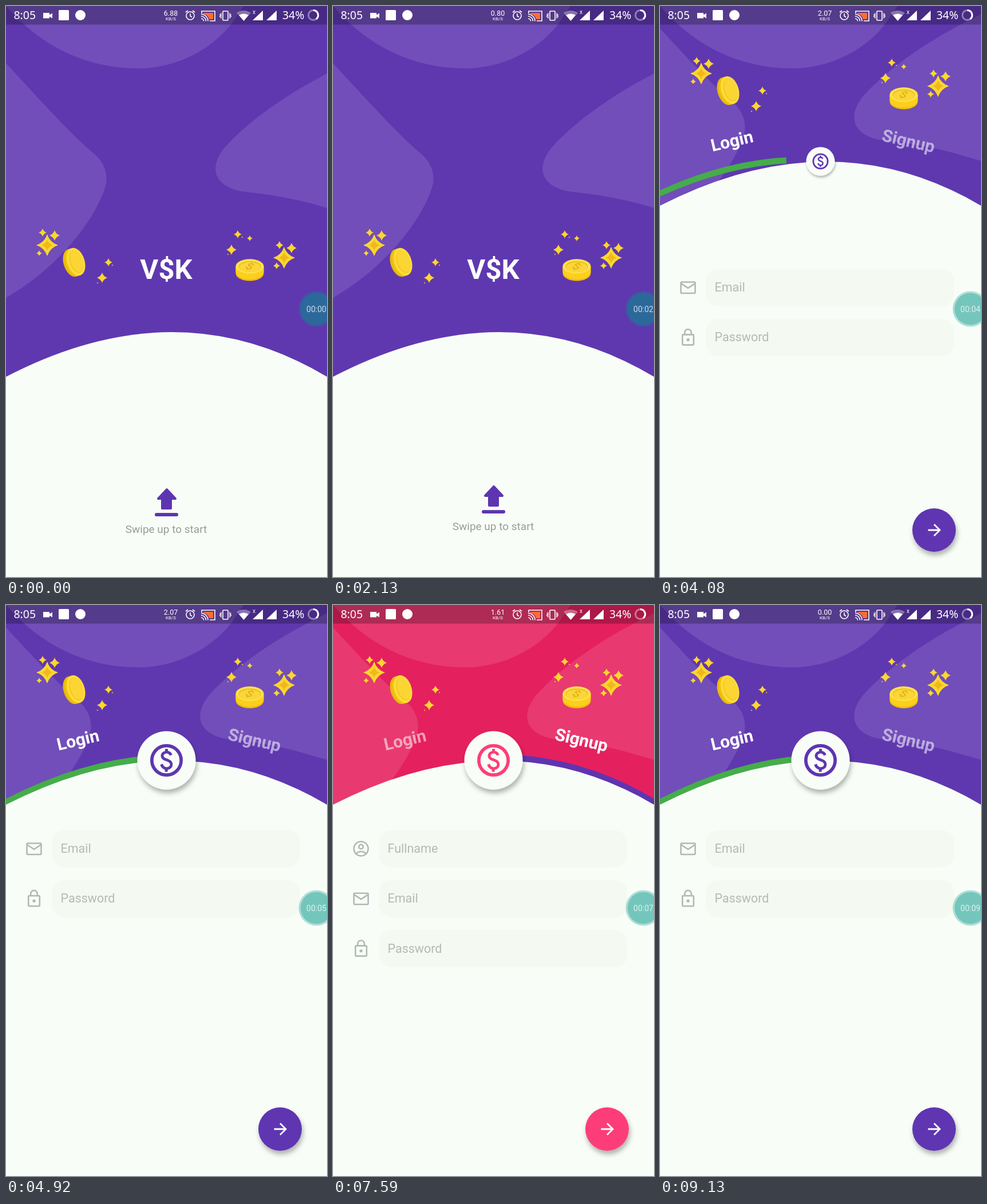
Animation of 561 by 998 pixels, one loop 9.16 s. Source, as an HTML page:

```html
<!DOCTYPE html>
<html lang="en">
<head>
<meta charset="utf-8">
<title>Onboarding</title>
<style>
  html, body { margin: 0; width: 100%; height: 100%; overflow: hidden; background: #f8fdf7; }
  svg { display: block; width: 561px; height: 998px; }
  text { font-family: Roboto, sans-serif; }
  .bar text { fill: #fff; }
  .bar .sys { font: 19.4px "Noto Sans", "Open Sans", sans-serif; }
  .tab { font-size: 30px; font-weight: 700; fill: #fff; text-anchor: middle; }
  .hint { font-size: 21.5px; fill: #b5bab8; }
  .line { fill: none; stroke: #b2b8b6; stroke-width: 2.6; }
  .thin { fill: none; stroke: #fff; stroke-width: 1.6; }
</style>
</head>
<body>
<svg viewBox="0 0 561 998">
  <defs>
    <filter id="shadow" x="-40%" y="-40%" width="180%" height="190%">
      <feDropShadow dx="2" dy="6" stdDeviation="4.5" flood-color="#000" flood-opacity=".3"/>
    </filter>
    <clipPath id="half"><rect id="window" width="280.5" height="998"/></clipPath>
    <path id="star" d="M0-1Q.25-.25 1 0Q.25.25 0 1Q-.25.25-1 0Q-.25-.25 0-1Z"/>
    <path id="dollar" d="M12.89 11.1c-1.78-.59-2.64-.96-2.64-1.9 0-1.02 1.11-1.39 1.81-1.39 1.31 0 1.79.99 1.9 1.34l1.58-.67c-.15-.44-.82-1.91-2.66-2.23V5h-1.75v1.26c-2.6.56-2.62 2.85-2.62 2.96 0 2.27 2.25 2.91 3.35 3.31 1.58.56 2.28 1.07 2.28 2.03 0 1.13-1.05 1.61-1.98 1.61-1.82 0-2.34-1.87-2.4-2.09l-1.66.67c.63 2.19 2.28 2.78 2.9 2.96V19h1.75v-1.24c.52-.09 3.02-.59 3.02-3.22.01-1.39-.6-2.61-3-3.44z"/>
    <g id="mail" class="line"><rect x="-12.5" y="-9.5" width="25" height="19.5" rx="1.5"/><path d="M-12-7L0 1L12-7"/></g>
    <g id="lock" class="line"><rect x="-9.8" y="-5" width="19.6" height="18" rx="1.5"/><path d="M-5.8-5v-3.6a5.8 5.8 0 0 1 11.6 0V-5"/><circle cy="4" r="1.4"/></g>
    <g id="user" class="line"><circle r="12.5"/><circle cy="-3.5" r="3.8"/><path d="M-8.5 8.5Q0 1 8.5 8.5"/></g>
  </defs>

  <rect width="561" height="998" fill="#5f38b0"/>
  <rect id="pink" height="700" fill="#e5205f"/>
  <g fill="#fff" fill-opacity=".11">
    <path d="M0 0C60 70 140 109 230 109C300 109 360 75 395 30L415 0Z"/>
    <g id="blobs">
      <path d="M0 100C60 165 110 220 150 255C170 270 178 290 175 310C165 355 105 450 0 510Z"/>
      <path d="M600 98L561 118C470 165 410 215 380 250C350 290 372 320 420 325C470 330 520 340 561 353L600 364Z"/>
    </g>
  </g>

  <g id="coins">
    <g id="stars" fill="#fdd62f"></g>
    <g transform="translate(119 448) rotate(-18)">
      <ellipse cx="-3.5" rx="15" ry="25" fill="#e8b70f"/>
      <ellipse cx="0" rx="15" ry="25" fill="#f2c40f"/>
      <ellipse cx="3.5" rx="15" ry="25" fill="#ffdc3a"/>
      <ellipse cx="4" rx="11.5" ry="20.5" fill="#f3c823"/>
      <ellipse cx="5" cy="-.5" rx="10.5" ry="19.500" fill="#fbd534"/>
    </g>
    <g transform="translate(426 455)">
      <path d="M-24.5 0v12a24.5 13.5 0 0 0 49 0V0Z" fill="#f3bd08"/>
      <path d="M-24.5 0v9a24.5 13.5 0 0 0 49 0V0Z" fill="#fbd01c"/>
      <ellipse rx="24.5" ry="12.8" fill="#ffe04a"/>
      <ellipse cy=".5" rx="19.5" ry="9.6" fill="#e8bc20"/>
      <ellipse cy="1.3" rx="18.5" ry="8.7" fill="#fad638"/>
      <use href="#dollar" fill="#e2b316" transform="scale(1.5 .95) rotate(28) translate(-12 -12)"/>
    </g>
  </g>

  <text id="title" x="280" y="477" font-size="49" font-weight="700" fill="#fafefa" text-anchor="middle">V$K</text>
  <g id="tabs">
    <text id="login" class="tab" transform="translate(128 246) rotate(-13)">Login</text>
    <text id="signup" class="tab" transform="translate(432 246) rotate(13)">Signup</text>
  </g>
  <path id="strip" clip-path="url(#half)"/>
  <path id="sheet" fill="#f8fdf7"/>

  <g id="swipe">
    <path d="M281 845L296 861H288V878H273V861H266Z" fill="#5e35b1" stroke="#5e35b1" stroke-width="4" stroke-linejoin="round"/>
    <rect x="260" y="886" width="41" height="6" rx="3" fill="#5e35b1"/>
    <text x="280" y="921" font-size="19" fill="#999d9b" text-anchor="middle">Swipe up to start</text>
  </g>

  <g id="pageA"></g>
  <g id="pageB"></g>

  <g id="badge">
    <circle r="51" fill="#f8fdf7" filter="url(#shadow)"/>
    <g id="coinIcon" transform="scale(2.85) translate(-12 -12)">
      <circle cx="12" cy="12" r="9" fill="none" stroke="currentColor" stroke-width="2"/>
      <use href="#dollar" fill="currentColor"/>
    </g>
  </g>

  <g class="bar">
    <rect width="561" height="32.5" fill="#000" fill-opacity=".25"/>
    <text class="sys" x="13.5" y="23">8:05</text>
    <path d="M65 12h11v3.5l5-3v9l-5-3V21.5H65Z" fill="#fff"/>
    <rect x="92" y="7" width="18" height="18" rx="1.5" fill="#fff"/>
    <circle cx="130" cy="16" r="9" fill="#fff"/>
    <text id="speed" x="288" y="16.5" font-size="12.5" text-anchor="middle"></text>
    <text x="288" y="25" font-size="8" text-anchor="middle">KB/S</text>
    <g class="thin">
      <circle cx="322" cy="17" r="7"/><path d="M322 13v4.5l3 2M314 11l4-3M330 11l-4-3"/>
      <path d="M342 13V9h23v17h-9"/>
      <path d="M341 22a4.500 4.500 0 0 1 4.500 4.500M341 18a8.500 8.500 0 0 1 8.500 8.500M341 14.500a12 12 0 0 1 12 12"/>
      <rect x="379" y="9" width="9" height="16" rx="1"/><path d="M376 12v10M391 12v10M373.5 14l1.5 2-1.5 2 1.5 2M393.5 14l-1.5 2 1.5 2-1.5 2" stroke-width="1.2"/>
    </g>
    <path d="M345 12h17v11h-7q-2-8-10-9Z" fill="#ff6b35"/>
    <path d="M403 12q12-8 25 0L415.5 26Z" fill="#fff" fill-opacity=".35"/>
    <path d="M407 16q8.500-5 17 0L415.500 26ZM449 8v17h-18ZM473 8v17h-18Z" fill="#fff"/>
    <text x="431" y="14" font-size="10">x</text>
    <text class="sys" x="483" y="23">34%</text>
    <circle cx="537" cy="16" r="8.5" fill="none" stroke="#fff" stroke-opacity=".4" stroke-width="3"/>
    <path d="M537 7.5a8.5 8.5 0 0 1 5 15.4" fill="none" stroke="#fff" stroke-width="3"/>
  </g>

  <g>
    <circle cx="542.5" cy="529.5" r="29" fill="none" stroke="#009688" stroke-opacity=".3" stroke-width="4"/>
    <circle cx="542.5" cy="529.5" r="27.500" fill="#009688" fill-opacity=".53"/>
    <text id="clock" x="542.5" y="535" font-size="14" fill="#fff" fill-opacity=".75" text-anchor="middle"></text>
  </g>
</svg>

<script>
const LOOP = 9160;
const PURPLE = '#5e35b1', ROSE = '#fd3e7a', GREEN = '#45ad49';
const $ = id => document.getElementById(id);
const set = (id, name, value) => $(id).setAttribute(name, value);
const move = (id, x, y) => set(id, 'transform', `translate(${x} ${y})`);

// x, y, radius
const stars = [
  [72, 418, 19], [64, 396, 7], [85, 401, 9], [58, 432, 5], [179, 448, 7], [168, 475, 9],
  [186, 453, 1.5], [160, 484, 1.5], [405, 399, 7], [426, 406, 5], [394, 426, 9],
  [413, 404, 1.5], [388, 434, 1.5], [486, 440, 19], [478, 418, 7], [499, 423, 9], [473, 454, 6]
];
$('stars').innerHTML = stars.map(([x, y, r]) =>
  `<use href="#star" transform="translate(${x} ${y}) scale(${r})"/>` +
  (r > 15 ? `<use href="#star" fill="#eeb91d" transform="translate(${x} ${y}) scale(${r / 2})"/>` : '')
).join('');

const field = ([icon, label], i) => `<g transform="translate(0 ${426 + 87.3 * i})">
  <use href="#${icon}" x="49"/>
  <rect x="80" y="-32.5" width="434" height="65" rx="22" fill="#f4f9f1"/>
  <text class="hint" x="95.5" y="7">${label}</text></g>`;

const page = (name, color, fields) => `<g id="form${name}">${fields.map(field).join('')}</g>
  <g id="fab${name}"><circle r="38" fill="${color}" filter="url(#shadow)"/>
  <path d="M-10.5 0H9M0-10L10 0L0 10" fill="none" stroke="#fff" stroke-width="2.8"/></g>`;

const access = [['mail', 'Email'], ['lock', 'Password']];
$('pageA').innerHTML = page('A', PURPLE, access);
$('pageB').innerHTML = page('B', ROSE, [['user', 'Fullname'], ...access]);
move('fabB', 479, 916);

const ramp = (t, start, length) => Math.min(1, Math.max(0, (t - start) / length));
const outCubic = p => 1 - (1 - p) ** 3;
const inOutCubic = p => p < .5 ? 4 * p ** 3 : 1 - 4 * (1 - p) ** 3;
const inOutBack = p => {
  const c = 2.5949, q = p < .5 ? 2 * p : 2 - 2 * p;
  const v = q * q * ((c + 1) * q - c) / 2;
  return p < .5 ? v : 1 - v;
};

const speeds = [[0, '6.88'], [200, '0.80'], [3200, '2.07'], [6200, '1.61'], [9100, '0.00']];

function draw(t) {
  // Opening: the hill peaks slightly right of the middle
  const top = 570 - 298 * inOutCubic(ramp(t, 3290, 680));
  const edge = 648 - 299 * inOutCubic(ramp(t, 3320, 680));
  const peak = `300 ${2 * top - edge}`;
  set('sheet', 'd', `M0 ${edge}Q${peak} 561 ${edge}V998H0Z`);
  const drift = inOutCubic(ramp(t, 3430, 540));
  move('blobs', -27 * drift, -90 * drift);
  move('coins', 0, -300 * inOutBack(ramp(t, 3330, 700)));
  move('title', 0, -516 * Math.sin(ramp(t, 3290, 770) * Math.PI / 2));
  move('swipe', 0, -5 * (1 - Math.cos(2 * Math.PI * t / 1704)));
  set('swipe', 'opacity', 1 - ramp(t, 3290, 120));
  set('tabs', 'opacity', ramp(t, 3700, 300));

  // Form entrance
  const enter = ramp(t, 3980, 500), left = 1 - outCubic(enter);
  move('formA', 0, 130 * left);
  set('formA', 'opacity', ramp(enter, 0, .2));
  set('fabA', 'transform', `translate(479 916) scale(${outCubic(ramp(t, 3800, 250))})`);
  set('badge', 'transform', `translate(280.5 271.5) scale(${1 - left})`);

  // Switching between the two forms
  const u = ramp(t, 5700, 505) - ramp(t, 8000, 505);
  const signing = t >= 5700 && t < 8000;
  const slide = 561 * inOutCubic(u);
  move('pageA', -slide, 0);
  move('pageB', 561 - slide, 0);
  set('pageB', 'opacity', u > 0 ? 1 : 0);
  set('pink', 'width', 561 * u ** 1.35);
  const fade = Math.min(1, u * 3);
  set('login', 'opacity', 1 - .45 * fade);
  set('signup', 'opacity', .55 + .45 * fade);
  set('coinIcon', 'color', signing ? ROSE : PURPLE);

  // Coloured strip along one half of the hill
  const lag = 1 - outCubic(ramp(t, 3880, 500));
  set('window', 'x', 280.5 * (1 - (1 - u) ** 1.6));
  set('strip', 'd', `M0 ${edge - 10.5}Q300 ${2 * top - edge - 10.5} 561 ${edge - 10.5}V${edge + .5}Q${peak} 0 ${edge + .5}Z`);
  set('strip', 'fill', signing ? PURPLE : GREEN);
  set('strip', 'opacity', t < 3880 ? 0 : 1);
  set('strip', 'transform', `translate(${-280 * lag} ${13 * lag}) rotate(${-9.5 * lag} 280 265)`);

  // Readouts
  $('speed').textContent = speeds.filter(s => s[0] <= t).pop()[1];
  $('clock').textContent = '00:0' + Math.floor((t + 200) / 1000);
}

function tick() {
  draw(performance.now() % LOOP);
  requestAnimationFrame(tick);
}
tick();
</script>
</body>
</html>
```
